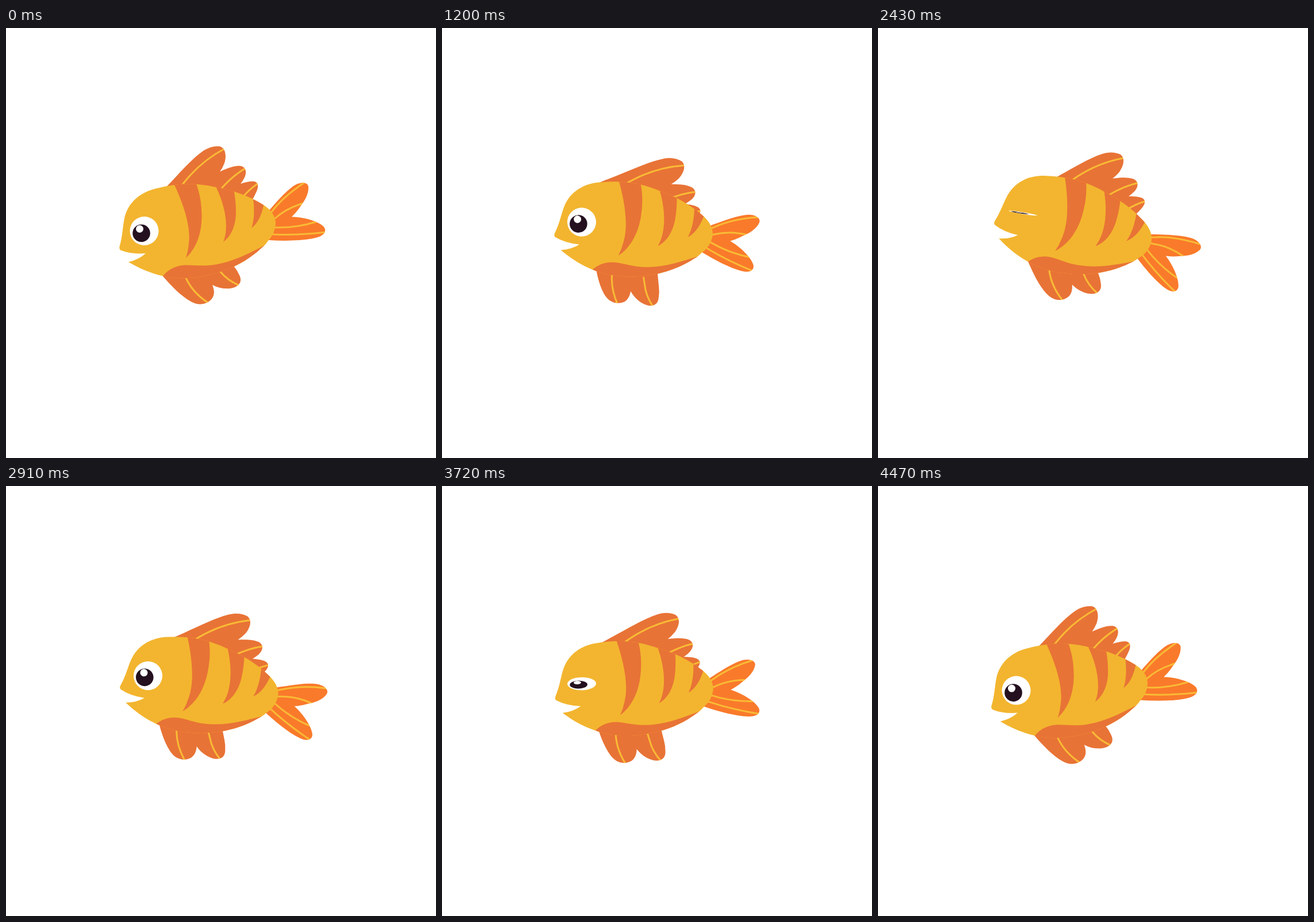
These frames come from a looping animation (748x748 px, 4.5 s). An HTML page:

```html
<!DOCTYPE html>
<html lang="en">
<head>
<meta charset="utf-8">
<title>Swimming fish</title>
<style>
  html, body { margin: 0; width: 100%; height: 100%; overflow: hidden; background: #fff; }
  svg { display: block; width: 100%; height: 100%; }
  .fin { fill: #e87336; }
  .tail { fill: #f97a2b; }
  .vein { fill: none; stroke: #f9bb35; stroke-width: 3; }
</style>
</head>
<body>
<svg viewBox="0 0 748 748">
  <defs>
    <path id="shape" d="M199.500 386.500Q196.500 385 197.500 380C203 362 203 345 206 331C213 301 236 285 262 279C275 276 283 274 293 273C318 269 345 272 366 277C395 282 422 292 445 306C462 316 469 328 469 340C468 354 463 363 456 370C452 376 448 380 444 383C426 400 405 412 385 420C355 431 325 437 295 435C265 432 238 422 213 407Q231 403 243 392Q218 394 199.500 386.500Z"/>
    <path id="dorsalShape" d="M250 307L264 292C290 266 318 232 340 216C352 207 363 205 372 206C382 209 384 222 380 235Q377 243 372 250C385 244 398 239 408 240C418 242 419 251 415 260Q412 266 408 271C417 268 426 266 432 267C440 269 439 277 436 284Q433 291 429 298L425 320L300 320Z"/>
    <path id="bellyShape" d="M262 418L273 432C288 449 304 466 322 476C335 483 346 481 354 475C364 467 363 457 359 447C372 454 388 455 398 451C409 446 410 438 406 430Q402 421 396 414L375 388L290 395Z"/>
    <path id="tailShape" d="M440 340L451 325L458 317C475 297 490 281 503 273C514 267 525 268 526 276C527 288 520 300 513 309Q506 320 497 328.500C520 329 545 337 553 346C558 353 554 359 545 363C525 370 490 371 457 369L445 358Z"/>
    <clipPath id="bodyClip"><use href="#shape"/></clipPath>
    <clipPath id="dorsalClip"><use href="#dorsalShape"/></clipPath>
    <clipPath id="bellyClip"><use href="#bellyShape"/></clipPath>
    <clipPath id="tailClip"><use href="#tailShape"/></clipPath>
  </defs>
  <g id="fish">
    <g id="tail">
      <use href="#tailShape" class="tail"/>
      <path class="vein" clip-path="url(#tailClip)" d="M450 335L461 321Q482 293 519 269M452 344L467 332Q488 313 517 305M452 346L468 347Q505 348 540 337M452 357L466 359Q510 361 558 355"/>
    </g>
    <g id="dorsal">
      <use href="#dorsalShape" class="fin"/>
      <path class="vein" clip-path="url(#dorsalClip)" d="M298 284L308 271Q338 232 382 209M367 289L375 279Q394 257 418 243M405 304L413 293Q424 280 439 270"/>
    </g>
    <g id="belly">
      <use href="#bellyShape" class="fin"/>
      <path class="vein" clip-path="url(#bellyClip)" d="M305 420L313 435Q325 461 353 479M364 414L373 424Q385 439 406 448"/>
    </g>
    <use href="#shape" fill="#f3b52f"/>
    <g class="fin" clip-path="url(#bodyClip)">
      <path d="M272 433C280 422 292 414 310 412.500C325 412 335 414 352 413C390 410 422 392 449 378.500L456 420L300 450Z"/>
      <path d="M290 265L293 273C308 305 322 345 318 375Q317 388 313 400C328 386 341 362 340.500 325C340 303 337 288 331 271L329 262Z"/>
      <path d="M362 270C378 300 390 342 378 372C392 362 400 343 400 320Q400 300 396 280L394 272Z"/>
      <path d="M428.500 288Q435 325 427 348Q442 337 448 309L451 298Z"/>
    </g>
    <g id="eye">
      <circle cx="240.500" cy="353" r="25" fill="#fff"/>
      <circle cx="235.500" cy="357" r="15.300" fill="#24101f"/>
      <circle cx="232.500" cy="349.500" r="6.500" fill="#fff"/>
    </g>
  </g>
</svg>
<script>
const LOOP = 4500, STEP = 30;
const parts = {};
for (const id of ['fish', 'tail', 'dorsal', 'belly', 'eye']) parts[id] = document.getElementById(id);

// Drift of the whole fish: time, offset.
const driftX = [[0, 0], [250, 6.5], [660, 3.6], [1000, 3], [1250, 1], [1710, 6.4], [2430, 7.7],
  [2680, 7.5], [2910, 4.2], [3400, -0.7], [3720, 2], [4050, 5], [4470, 0]];
const driftY = [[0, 0], [250, 0], [560, -1.5], [660, 0.3], [1200, 0], [1710, -4.1], [2430, -4.6],
  [2910, -2.6], [3400, 1], [3720, 1], [3950, 2], [4330, -2], [4470, 3]];
const blinks = [2430, 3800];

const smooth = u => u * u * (3 - 2 * u);
const wave = (t, period) => 1 - Math.abs(2 * (t % period) / period - 1);
const turn = (a, x, y) => `rotate(${a.toFixed(3)} ${x} ${y})`;

// Hermite curve through the keys, flat at turning points.
function curve(keys, t) {
  const rate = i => (keys[i + 1][1] - keys[i][1]) / (keys[i + 1][0] - keys[i][0]);
  const last = keys.length - 1;
  const slope = i => {
    if (i === 0 || i === last) return rate(i ? i - 1 : 0);
    const a = rate(i - 1), b = rate(i);
    return a * b > 0 ? 2 * a * b / (a + b) : 0;
  };
  let i = 0;
  while (i < last - 1 && t > keys[i + 1][0]) i++;
  const [t0, v0] = keys[i], [t1, v1] = keys[i + 1];
  const d = t1 - t0, u = (t - t0) / d, s = smooth(u);
  return v0 + (v1 - v0) * s + d * u * (1 - u) * ((1 - u) * slope(i) - u * slope(i + 1));
}

function eyeOpen(t) {
  const gap = Math.min(...blinks.map(b => Math.abs(t - b)));
  return 0.06 + 0.94 * smooth(Math.min(1, gap / 180));
}

function draw(t) {
  const sway = wave(t, LOOP), flap = smooth(wave(t, LOOP / 2));
  const set = (id, value) => parts[id].setAttribute('transform', value);
  const x = curve(driftX, t).toFixed(3), y = curve(driftY, t).toFixed(3);
  set('fish', `translate(${x} ${y}) ${turn(18 * sway, 333, 353)}`);
  set('tail', turn(35 * smooth(sway), 458, 346));
  set('dorsal', turn(15.2 * flap, 331, 298));
  set('belly', turn(24 * flap, 327, 418));
  set('eye', `translate(240.5 353) rotate(-7.2) scale(1 ${eyeOpen(t).toFixed(4)}) rotate(7.2) translate(-240.5 -353)`);
}

const start = performance.now();
function tick() {
  const t = (performance.now() - start) % LOOP;
  draw(Math.floor(t / STEP) * STEP);
  requestAnimationFrame(tick);
}
draw(0);
requestAnimationFrame(tick);
</script>
</body>
</html>
```
